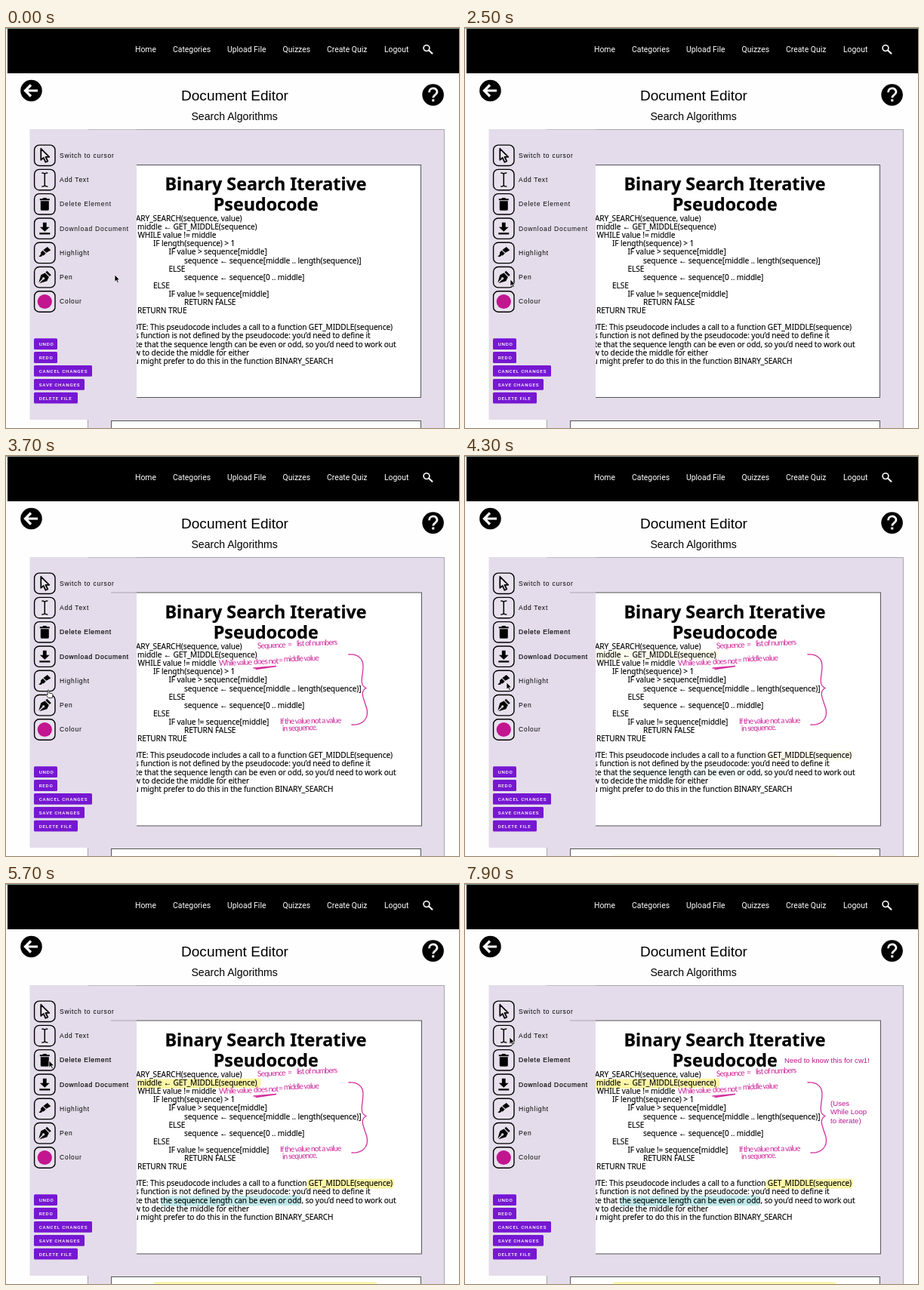
Animation of 600x530 px, one loop 8 s. Source, as an HTML page:

```html
<!DOCTYPE html>
<html lang="en">
<head>
<meta charset="utf-8">
<title>Document Editor</title>
<style>
  html, body { margin: 0; width: 100%; height: 100%; overflow: hidden; background: #fefefe; }
  svg { display: block; width: 600px; height: 530px; }
  .nav { font: 10.4px Roboto, sans-serif; fill: #fff; }
  .sans { font-family: "Liberation Sans", Arial, sans-serif; }
  .label { font-size: 8.5px; letter-spacing: .76px; }
  .btn { font: 500 6.25px Roboto, sans-serif; letter-spacing: .75px; fill: #fff; }
  .head { font: 700 23.25px "Noto Sans", sans-serif; text-anchor: middle; stroke: #000; stroke-width: .25; }
  .code { font: 10.15px "Noto Sans", sans-serif; letter-spacing: -.1px; white-space: pre; stroke: #000; stroke-width: .12; }
  .ink { font: 10.4px Lato, sans-serif; letter-spacing: -.93px; fill: #cf2a9c; }
  .stroke { fill: none; stroke: #d52f9f; stroke-width: 1.3; stroke-linecap: round; }
  .note { font-size: 9.63px; fill: #bd1590; }
  .icon { stroke-linejoin: round; }

  #cursor, #arrow, #hand, .ann, .marks, .notes, .early { animation: 8s infinite; }
  #cursor { animation-name: move; }
  #arrow { animation-name: arrow; animation-timing-function: step-end; }
  #hand { animation-name: hand; animation-timing-function: step-end; }
  .ann { animation-name: ann; }
  .early { animation-name: early; }
  .marks { animation-name: marks; }
  .notes { animation-name: notes; }

  @keyframes move {
    0%, 16.25% { transform: translate(144px, 327px); animation-timing-function: steps(8, start); }
    26.25%, 42.5% { transform: translate(60px, 333px); animation-timing-function: steps(4, start); }
    47.5% { transform: translate(56px, 310px); animation-timing-function: steps(5, start); }
    53.75%, 62.5% { transform: translate(55px, 300px); animation-timing-function: steps(8, start); }
    72.5% { transform: translate(57px, 234px); animation-timing-function: steps(5, start); }
    78.75%, 100% { transform: translate(59px, 203px); }
  }
  @keyframes hand {
    0%, 31.25%, 52.5%, 68.75%, 77.5%, 100% { opacity: 0; }
    23.75%, 45%, 65%, 75% { opacity: 1; }
  }
  @keyframes arrow {
    0%, 31.25%, 52.5%, 68.75%, 77.5%, 100% { opacity: 1; }
    23.75%, 45%, 65%, 75% { opacity: 0; }
  }
  @keyframes ann {
    0%, 32.5% { opacity: 0; animation-timing-function: steps(5, start); }
    38.75%, 100% { opacity: 1; }
  }
  @keyframes early {
    0%, 32.5% { opacity: 1; animation-timing-function: steps(5, start); }
    38.75%, 100% { opacity: 0; }
  }
  @keyframes marks {
    0%, 53.75% { opacity: 0; animation-timing-function: steps(5, start); }
    60%, 100% { opacity: 1; }
  }
  @keyframes notes {
    0%, 77.5% { opacity: 0; animation-timing-function: steps(4, start); }
    82.5%, 100% { opacity: 1; }
  }
</style>
</head>
<body>
<svg viewBox="0 0 600 530">
  <clipPath id="page"><rect x="173" y="134" width="407" height="396"/></clipPath>

  <!-- Header -->
  <rect x="2" width="598" height="60"/>
  <rect width="600" height="1" fill="#8fa39a"/>
  <g id="nav" class="nav"></g>
  <g fill="none" stroke="#fff" stroke-width="1.6">
    <circle cx="557" cy="26.6" r="3.9"/><path d="M560 29.6L565 34.3" stroke-width="2"/>
  </g>
  <circle cx="33.5" cy="83" r="14.3"/>
  <path d="M42 83H26M33 75.5L25.5 83L33 90.5" fill="none" stroke="#fff" stroke-width="3.2"/>
  <circle cx="565.6" cy="88.6" r="14.3"/>
  <path d="M560.5 85.2C560.5 78.3 571 78.3 571 84.8C571 88.8 565.8 88.6 565.8 92.6" fill="none" stroke="#fff" stroke-width="2.8"/>
  <rect x="564.3" y="94.4" width="3" height="3" fill="#fff"/>
  <g class="sans" text-anchor="middle">
    <text x="303" y="95.7" font-size="19.07">Document Editor</text>
    <text x="302.6" y="121.6" font-size="14.1">Search Algorithms</text>
  </g>

  <!-- Document -->
  <path d="M108.5 540V134.5H580.5V540" fill="#e4dcea" stroke="#a9a4ad"/>
  <g fill="#fff" stroke="#555">
    <rect class="early" x="139.5" y="181.5" width="410" height="308"/>
    <rect class="ann" x="139.5" y="181" width="411" height="309"/>
    <rect x="139.5" y="520.5" width="410" height="30"/>
  </g>
  <g class="marks" clip-path="url(#page)">
    <path d="M170 258.5L336 257.5Q340 264 335 270L170 271.5Z" fill="#fcf6a6"/>
    <path d="M399 391.5L513 390.5Q516 397 512 403.5L398 404Z" fill="#fcf6a6"/>
    <path d="M207 413.5L390 412.5Q393 420 389 426L205 427Z" fill="#bfe8e8"/>
    <rect x="196" y="527.5" width="295" height="3" fill="#fcf6a6"/>
  </g>
  <g class="head">
    <text x="344" y="215">Binary Search Iterative</text>
    <text x="344.3" y="242">Pseudocode</text>
  </g>
  <g id="code" class="code" clip-path="url(#page)"></g>

  <!-- Annotations -->
  <g class="ann">
    <g class="ink">
      <text transform="translate(333 255) rotate(-2)">Sequence</text>
      <text x="373" y="253">=</text>
      <text transform="translate(385 252) rotate(-2)">list of numbers</text>
      <text transform="translate(282 278) rotate(-2)">While value</text>
      <text transform="translate(328 276) rotate(-2)">does not</text>
      <text x="361" y="273.5">=</text>
      <text transform="translate(368 272.5) rotate(-2)">middle value</text>
      <text transform="translate(363 355) rotate(-1)">If the value not a value</text>
      <text transform="translate(366 364.5) rotate(-2)">in sequence.</text>
    </g>
    <path class="stroke" d="M328 281L358 278.5L331 282.5M454 263C464 262 473 267 473 278C473 292 467 303 477 307.5C468 312 474 322 478 335C481 350 470 357 458 356"/>
  </g>
  <g class="notes sans note">
    <text x="423" y="237">Need to know this for cw1!</text>
    <text x="484" y="293.5">(Uses</text>
    <text x="484" y="305">While Loop</text>
    <text x="484" y="316.5">to iterate)</text>
  </g>

  <!-- Tool panel -->
  <rect x="31.5" y="134" width="141.5" height="385" fill="#e4dcea"/>
  <path d="M108 134.5H173" stroke="#c2bcc7"/>
  <path class="ann" d="M139 181H173" stroke="#aaa3b0"/>
  <g id="tools"></g>
  <g id="buttons"></g>

  <g id="cursor">
    <path id="arrow" d="M0 0V9.3L2.2 7.3L3.8 10.8L5.3 10.1L3.8 6.7H6.6Z" stroke="#fff" stroke-width=".7"/>
    <path id="hand" d="M-.8 .5Q.2-.8 1 .6V4L5 4.8Q6.3 5.2 6 7L5.2 10.5H.2L-3 6.6Q-2.7 5.2-.8 6.5Z" fill="#fff" stroke="#222" stroke-width=".9"/>
  </g>
</svg>
<script>
  const put = (id, html) => { document.getElementById(id).innerHTML = html; };

  put('nav', [['Home', 171], ['Categories', 221], ['Upload File', 293], ['Quizzes', 366.5],
    ['Create Quiz', 425], ['Logout', 501]]
    .map(([s, x]) => `<text x="${x}" y="31.5">${s}</text>`).join(''));

  // Each line: text, x, row; lines ending in "e" hang from their right edge.
  const lines = [
    ['BINARY_SEARCH(sequence, value)', 312.5, 0, 'e'],
    ['middle ← GET_MIDDLE(sequence)', 332.5, 1, 'e'],
    ['WHILE value != middle', 174.5, 2],
    ['IF length(sequence) &gt; 1', 195, 3],
    ['IF value &gt; sequence[middle]', 215.5, 4],
    ['sequence ← sequence[middle .. length(sequence)]', 236, 5],
    ['ELSE', 215.5, 6],
    ['sequence ← sequence[0 .. middle]', 236, 7],
    ['ELSE', 195, 8],
    ['IF value != sequence[middle]', 215.5, 9],
    ['RETURN FALSE', 236, 10],
    ['RETURN TRUE', 174, 11],
    ['NOTE: This pseudocode includes a call to a function GET_MIDDLE(sequence)', 512, 13, 'e'],
    ['This function is not defined by the pseudocode: you’d need to define it', 482.5, 14, 'e'],
    ['Note that the sequence length can be even or odd, so you’d need to work out', 516.5, 15, 'e'],
    ['how to decide the middle for either', 322, 16, 'e'],
    ['You might prefer to do this in the function BINARY_SEARCH', 433.5, 17, 'e']
  ];
  put('code', lines.map(([s, x, row, end]) =>
    `<text x="${x}" y="${256 + row * 11.1}"${end ? ' text-anchor="end"' : ''}>${s}</text>`).join(''));

  const icons = {
    'Switch to cursor': '<path d="M-5-9V6L-1.6 3L1.2 9L4 7.7L1.2 2H6Z" fill="#eee8f2" stroke="#000" stroke-width="1.8"/>',
    'Add Text': '<path d="M-4-9Q0-9 0-7Q0-9 4-9M0-8V8M-4 9Q0 9 0 7Q0 9 4 9" fill="none" stroke="#000" stroke-width="1.5"/>',
    'Delete Element': '<path d="M-6.5-7H-3L-2-8.3H2L3-7H6.5V-5H-6.5ZM-5.5-4H5.5V7Q5.5 8.5 4 8.5H-4Q-5.5 8.5-5.5 7Z"/>',
    'Download Document': '<path d="M-2.4-8H2.4V-2H6.4L0 4.2L-6.4-2H-2.4ZM-7 5.6H7V7.8H-7Z"/>',
    'Highlight': '<path d="M3.5-8L8-3.5L2-.2L-1.8-4Z"/><path d="M-2.6-3.2L1.4 .8L-1.5 3.6L-3.3 3.4L-4.5 5H-8L-5.3 2L-5.2-.6Z"/>',
    'Pen': '<path d="M3-8.5L8.5-3L6.5-1.2L1.2-6.5ZM.3-5.6L5.6-.3L3 5L-7 8L-2.2 3.2A1.6 1.6 0 1 0-3.2 2.2L-8 7L-5-3Z"/>',
    'Colour': '<circle r="9.6" fill="#c2158f"/>'
  };
  put('tools', Object.entries(icons).map(([name, art], i) => {
    const y = 168.8 + i * 32.28;
    const bold = i === 2 || i === 3 ? ' stroke="#000" stroke-width=".2"' : '';
    return `<rect x="37.6" y="${y - 13.7}" width="27.4" height="27.4" rx="6.5" fill="#e8e1ed" stroke="#000" stroke-width="1.4"/>
      <g class="icon" transform="translate(51.3 ${y})">${art}</g>
      <text class="sans label" x="71" y="${y + 3}"${bold && ' opacity=".95"'}>${name}</text>
      ${bold && `<text class="sans label ann" x="71" y="${y + 3}" fill="none"${bold}>${name}</text>`}`;
  }).join(''));

  put('buttons', [['UNDO', 31], ['REDO', 31], ['CANCEL CHANGES', 77], ['SAVE CHANGES', 67], ['DELETE FILE', 58]]
    .map(([s, w], i) => {
      const y = 411.2 + i * 17.9;
      return `<rect x="37" y="${y}" width="${w}" height="14.8" rx="1.5" fill="#7617d2"/>
        <text class="btn" x="43.7" y="${y + 9.7}">${s}</text>`;
    }).join(''));
</script>
</body>
</html>
```
